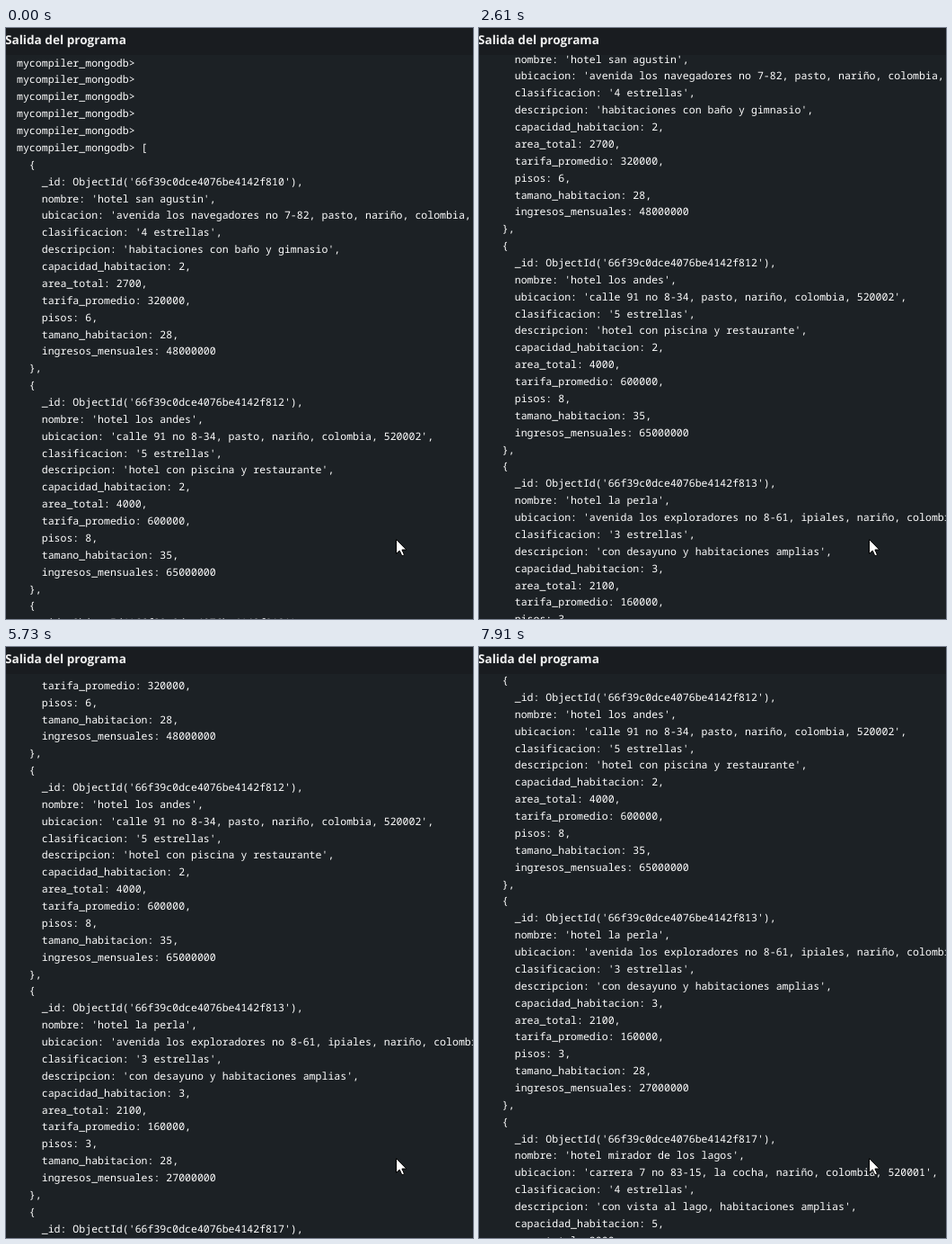
These frames come from a looping animation (520 px wide and 657 px high, 8000 ms). An HTML page with a canvas:

```html
<!DOCTYPE html>
<html lang="es">
<head>
<meta charset="utf-8">
<title>Salida del programa</title>
<style>
  html, body { margin: 0; width: 100%; height: 100%; overflow: hidden; background: #1c2125; }
  canvas { display: block; }
</style>
</head>
<body>
<canvas id="stage" width="520" height="657"></canvas>
<script>
const ctx = document.getElementById('stage').getContext('2d');
const W = 520, H = 657, HEADER = 30, LOOP = 8000;
const LEFT = 12, FIRST_LINE = 38.6, PITCH = 18.87, BASELINE = 4;

const KEYS = ['nombre', 'ubicacion', 'clasificacion', 'descripcion', 'capacidad_habitacion',
  'area_total', 'tarifa_promedio', 'pisos', 'tamano_habitacion', 'ingresos_mensuales'];

const HOTELS = [
  ['10', 'hotel san agustin', 'avenida los navegadores no 7-82, pasto, nariño, colombia, 520001',
    '4 estrellas', 'habitaciones con baño y gimnasio', 2, 2700, 320000, 6, 28, 48000000],
  ['12', 'hotel los andes', 'calle 91 no 8-34, pasto, nariño, colombia, 520002',
    '5 estrellas', 'hotel con piscina y restaurante', 2, 4000, 600000, 8, 35, 65000000],
  ['13', 'hotel la perla', 'avenida los exploradores no 8-61, ipiales, nariño, colombia, 524060',
    '3 estrellas', 'con desayuno y habitaciones amplias', 3, 2100, 160000, 3, 28, 27000000],
  ['17', 'hotel mirador de los lagos', 'carrera 7 no 83-15, la cocha, nariño, colombia, 520001',
    '4 estrellas', 'con vista al lago, habitaciones amplias', 5, 3000, 400000, 4, 30, 50000000]
];

function hotelLines([id, ...values]) {
  const fields = values.map((v, i) => {
    const text = typeof v === 'string' ? `'${v}'` : v;
    return `    ${KEYS[i]}: ${text}${i < KEYS.length - 1 ? ',' : ''}`;
  });
  return ['  {', `    _id: ObjectId('66f39c0dce4076be4142f8${id}'),`, ...fields, '  },'];
}

const PROMPT = 'mycompiler_mongodb>';
const LINES = [...Array(5).fill(PROMPT), PROMPT + ' [', ...HOTELS.flatMap(hotelLines)];

// Scroll bursts: first step, last step (ms), number of steps, distance (px)
const BURSTS = [
  [90, 1150, 13, 56],
  [1710, 2610, 11, 99],
  [3240, 4470, 15, 57],
  [5030, 6450, 17, 69],
  [7010, 7910, 11, 79]
];

const ease = u => 1 - (1 - u ** 1.25) ** 2;

function scrollAt(t) {
  let y = 0;
  for (const [start, end, steps, distance] of BURSTS) {
    if (t < start) break;
    const step = Math.floor((t - start) / (end - start) * (steps - 1) + 0.15) + 1;
    y += distance * ease(Math.min(step / steps, 1));
  }
  return Math.round(y);
}

function drawLines(scroll) {
  ctx.font = '11.55px "Noto Sans Mono", "DejaVu Sans Mono", monospace';
  ctx.fillStyle = '#fff';
  LINES.forEach((line, i) => {
    const y = Math.round(FIRST_LINE + i * PITCH - scroll) + BASELINE;
    if (y > 10 && y < H + 15) ctx.fillText(line, LEFT, y);
  });
}

function drawHeader() {
  ctx.fillStyle = '#191c20';
  ctx.fillRect(0, 0, W, HEADER);
  ctx.font = 'bold 13.6px "Open Sans", "Noto Sans", sans-serif';
  ctx.fillStyle = '#f0f0f0';
  ctx.fillText('Salida del programa', -1, 18);
}

function drawPointer(x, y) {
  const arrow = [[0, 0], [0, 16], [3.7, 12.5], [6.4, 18.4], [9, 17.2], [6.4, 11.5], [11.3, 11.5]];
  ctx.beginPath();
  arrow.forEach(([dx, dy]) => ctx.lineTo(x + dx, y + dy));
  ctx.closePath();
  ctx.fillStyle = '#fff';
  ctx.fill();
  ctx.strokeStyle = '#000';
  ctx.lineWidth = 1;
  ctx.stroke();
}

function draw(t) {
  ctx.fillStyle = '#1c2125';
  ctx.fillRect(0, 0, W, H);
  drawLines(scrollAt(t));
  drawHeader();
  drawPointer(434.5, 568.5);
}

ctx.textRendering = 'geometricPrecision';
const began = performance.now();
function tick() {
  draw((performance.now() - began) % LOOP);
  requestAnimationFrame(tick);
}
tick();
</script>
</body>
</html>
```
